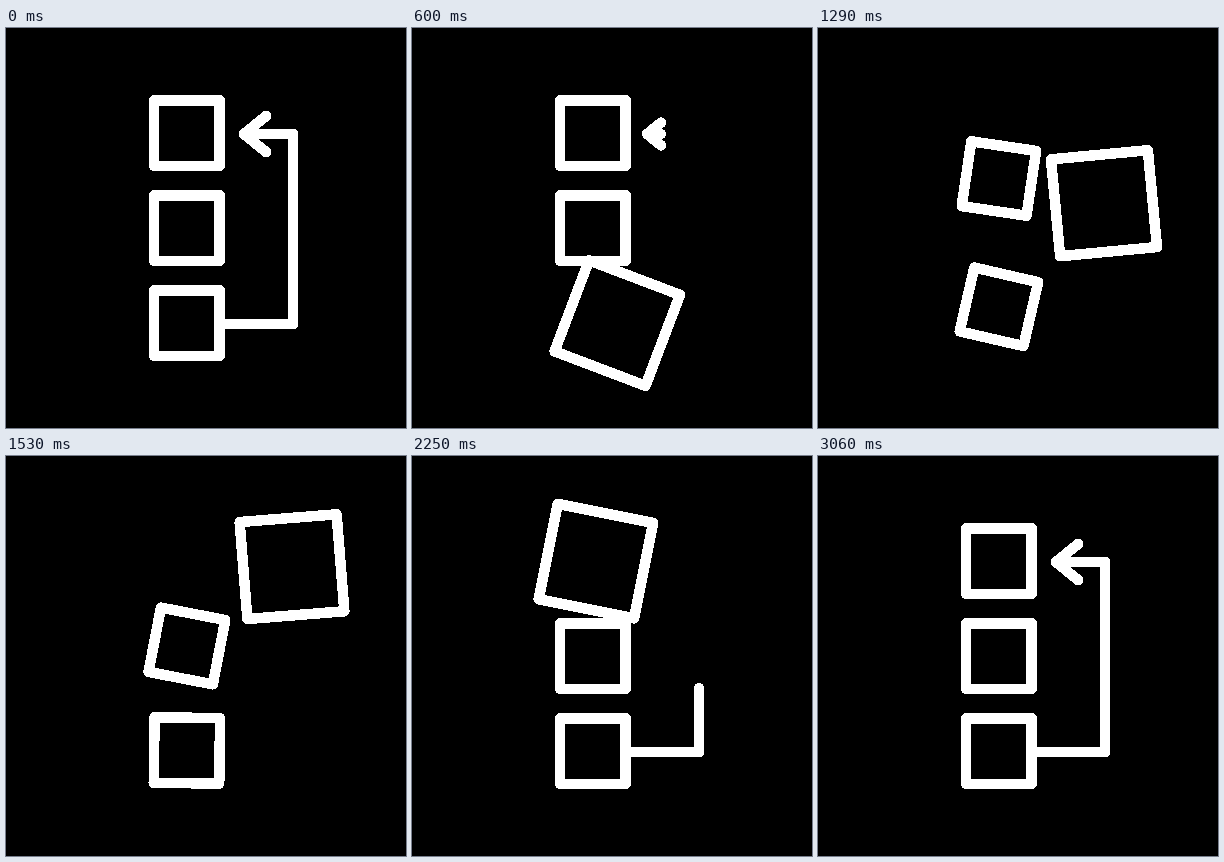
Write an HTML page that moves like this. It is 400 by 400 pixels and loops after 3630 ms.

```html
<!DOCTYPE html>
<html lang="en">
<head>
<meta charset="utf-8">
<title>Queue cycle</title>
<style>
  html, body { margin: 0; width: 100%; height: 100%; overflow: hidden; background: #000; }
  svg { display: block; width: 100vw; height: 100vh; }
  path, rect {
    fill: none; stroke: #fff; stroke-width: 10.5;
    stroke-linecap: round; stroke-linejoin: round;
    vector-effect: non-scaling-stroke; shape-rendering: crispEdges;
  }
</style>
</head>
<body>
<svg viewBox="0 0 400 400">
  <path id="line" pathLength="1"/>
  <path id="head"/>
  <rect id="top"/>
  <rect id="mid"/>
  <rect id="big"/>
</svg>
<script>
const LOOP = 3630, STEP = 30, END = 3060;
const X = 180.9, RIGHT = 286, TOP = 105.1, GAP = 95, SIDE = 65.5, GROWN = 1.485;
const LEAD = 182; // the lower small square moves first
const $ = id => document.getElementById(id);
const clamp = u => Math.max(0, Math.min(1, u));
const smooth = u => u * u * (3 - 2 * u);

// Cubic Bezier ease (0.3, 0, 0.35, 1).
function glide(u) {
  let lo = 0, hi = 1;
  for (let i = 0; i < 20; i++) {
    const s = (lo + hi) / 2, r = 1 - s;
    if (0.9 * s * r * r + 1.05 * s * s * r + s * s * s < u) lo = s; else hi = s;
  }
  return smooth(lo);
}

// Progress from 0 to 1 between two times.
const go = (t, from, to, ease = smooth) => ease(clamp((t - from) / (to - from)));

const drop = t => GAP * go(t, 1017, 1781, glide);
const sway = t => 13.5 * go(t, 1100, 1425) - 17.5 * go(t, 1425, 1860) + 4 * go(t, 1860, 2100);

const big = {
  x: t => X + (RIGHT - X) * (go(t, 441, 950) - go(t, 1773, 2354, glide)),
  y: t => TOP + 2 * GAP * (1 - go(t, 1007, 1646, glide)),
  turn: t => 21.3 * go(t, 0, 545) - 26.7 * go(t, 545, 1195)
           + 30.4 * go(t, 1470, 2080) - 25 * go(t, 2080, 2400),
  size: t => 1 + (GROWN - 1) * (go(t, 0, 450) - go(t, 2260, 2930))
};

const CORNERS = [[213, 296], [287, 296], [287, 106], [238, 106]];

// The part of the arrow line between two fractions of its length.
function trim(from, to) {
  const legs = CORNERS.slice(1).map((end, i) => {
    const start = CORNERS[i];
    return { start, end, len: Math.hypot(end[0] - start[0], end[1] - start[1]) };
  });
  const total = legs.reduce((sum, leg) => sum + leg.len, 0);
  const pts = [];
  let at = 0;
  for (const { start, end, len } of legs) {
    const a = clamp((from * total - at) / len), b = clamp((to * total - at) / len);
    if (a < b) for (const u of [a, b]) pts.push(start.map((v, k) => v + (end[k] - v) * u));
    at += len;
  }
  return pts.length ? "M" + pts.join("L") : "";
}

function arrowHead(k) {
  const p = (x, y) => [230 + x * k, 106 + y * k];
  return k > 0.02 ? "M" + [p(30, -18), p(8, 0), p(30, 18)].join("L") : "";
}

function place(id, x, y, turn, size = 1) {
  $(id).setAttribute("transform", `translate(${x} ${y}) rotate(${turn}) scale(${size})`);
}

function draw(now) {
  const t = Math.min(END, Math.floor(now % LOOP / STEP) * STEP);
  const leaving = t < 1200;
  $("line").setAttribute("d", leaving ? trim(go(t, 0, 675), 1) : trim(0, go(t, 1645, 2960)));
  $("head").setAttribute("d", arrowHead(leaving ? 1 - go(t, 470, 790) : go(t, 2730, 3030)));
  place("top", X, TOP + drop(t), sway(t));
  place("mid", X, TOP + GAP + drop(t + LEAD), sway(t + LEAD));
  place("big", big.x(t), big.y(t), big.turn(t), big.size(t));
}

for (const id of ["top", "mid", "big"]) {
  for (const side of ["x", "y"]) $(id).setAttribute(side, -SIDE / 2);
  for (const side of ["width", "height"]) $(id).setAttribute(side, SIDE);
}

const start = performance.now();
function tick() {
  draw(performance.now() - start);
  requestAnimationFrame(tick);
}
tick();
</script>
</body>
</html>
```
